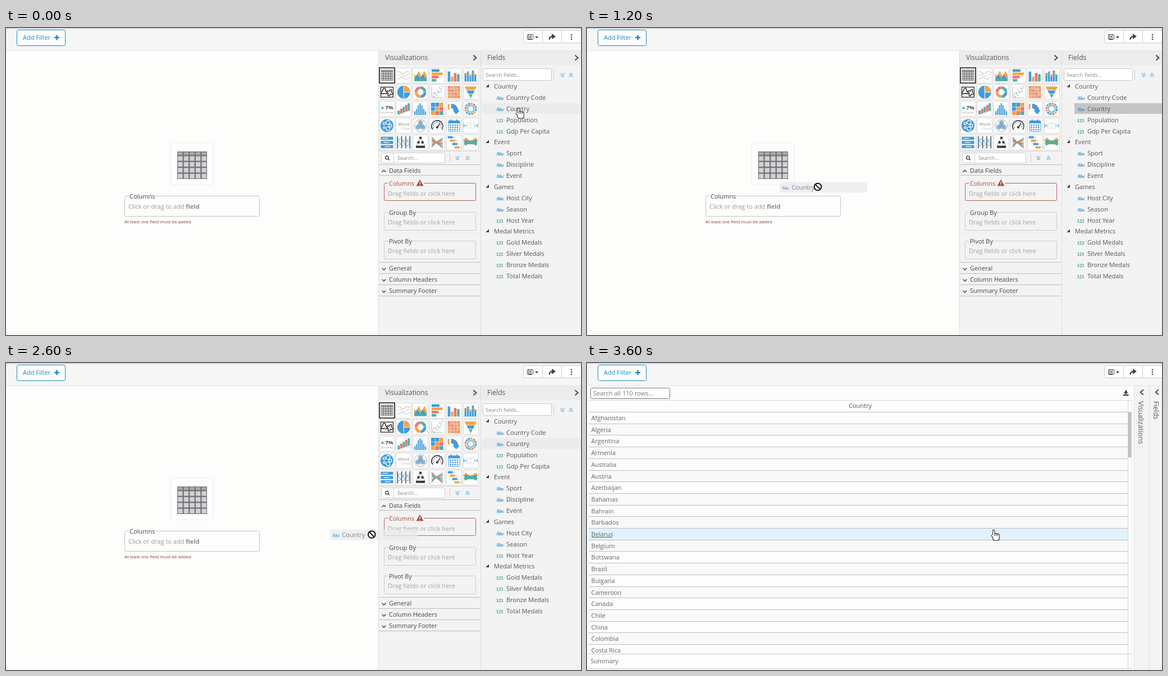
An HTML page with a canvas that plays this animation: 1024 by 547 pixels, repeating every 3.8 s.

```html
<!DOCTYPE html>
<html lang="en">
<head>
<meta charset="utf-8">
<title>Drag a field into a report</title>
<style>
html, body { margin: 0; width: 100%; height: 100%; overflow: hidden; background: #fdfdfc; }
canvas { display: block; width: 1024px; height: 547px; }
</style>
</head>
<body>
<canvas id="stage" width="1024" height="547"></canvas>
<script>
const g = document.getElementById('stage').getContext('2d');
const SANS = '"Open Sans", "Noto Sans", sans-serif';
const SERIF = '"Liberation Serif", serif';
const BLUE = '#429bdb', ORANGE = '#f5a443', TEAL = '#4fb59a', PINK = '#ee7379';
const COLORS = [BLUE, ORANGE, PINK, TEAL];
const INK = '#555', DARK = '#444', LINK = '#1c86c3', WARN = '#a94a45';
const PAGE = '#fdfdfc', PANEL = '#f3f3f3', RULE = '#bdbdbd', EDGE = '#dcdcdc';
const STEP = 200, STEPS = 19, TAU = 2 * Math.PI;
const { sin, cos, abs, floor } = Math;

function text(s, x, y, color = INK, size = 11, weight = 400, family = SANS) {
  g.font = `${weight} ${size}px ${family}`;
  g.fillStyle = color;
  g.fillText(s, x, y);
}
function rect(color, x, y, w, h) {
  g.fillStyle = color;
  g.fillRect(x, y, w, h);
}
const hline = (x, y, w, color = RULE) => rect(color, x, Math.round(y), w, 1);
const vline = (x, y, h, color = EDGE) => rect(color, x, y, 1, h);
function path(pts) {
  g.beginPath();
  for (let i = 0; i < pts.length; i += 2) g.lineTo(pts[i], pts[i + 1]);
}
function poly(color, ...pts) {
  path(pts);
  g.closePath();
  g.fillStyle = color;
  g.fill();
}
function line(color, width, ...pts) {
  path(pts);
  g.strokeStyle = color;
  g.lineWidth = width;
  g.stroke();
}
function round(x, y, w, h, r, fill, stroke) {
  g.beginPath();
  g.roundRect(x + .5, y + .5, w, h, r);
  if (fill) { g.fillStyle = fill; g.fill(); }
  if (stroke) { g.strokeStyle = stroke; g.lineWidth = 1; g.stroke(); }
}
function arc(color, width, x, y, r, from = 0, to = TAU) {
  g.beginPath();
  g.arc(x, y, r, from, to);
  g.strokeStyle = color;
  g.lineWidth = width;
  g.stroke();
}
function dot(color, x, y, r) {
  g.beginPath();
  g.arc(x, y, r, 0, TAU);
  g.fillStyle = color;
  g.fill();
}
function at(x, y, draw, turn = 0) {
  g.save();
  g.translate(x, y);
  g.rotate(turn);
  draw();
  g.restore();
}
const each = (n, fn) => { for (let i = 0; i < n; i++) fn(i); };
const grid = (cols, rows, fn) => each(rows, r => each(cols, c => fn(c, r)));
const sideChevron = (x, y, d) => line(DARK, 1.8, x - d, y - 4.5, x + d, y, x - d, y + 4.5);
const chevron = (x, y, d, color = DARK, width = 1.5) => line(color, width, x - 3.2, y - d, x, y + d, x + 3.2, y - d);
function expandCollapse(x, y, gap) {
  each(4, i => chevron(x + (i >> 1) * gap, y - 2 + i % 2 * 3.5, i < 2 ? 1.6 : -1.6, LINK, 1));
}

// Icon helpers work in a box from -11 to 11
function curve(f) {
  const pts = [];
  for (let x = -11; x <= 11; x++) pts.push(x, f(x));
  return pts;
}
const trace = (color, f, width = 1.2) => line(color, width, ...curve(f));
const area = (color, f, base = 10) => poly(color, -11, base, ...curve(f), 11, base);
const saw = (x, n) => abs((x / n % 1 + 1) % 1 - .5) * 2;
function bars(n, height, color = () => BLUE) {
  each(n, i => rect(color(i), -11 + i * 22 / n, 11 - height(i), 22 / n - 1, height(i)));
}
const ring = (n, r, width, gap = 0) =>
  each(n, i => arc(COLORS[i % 4], width, 0, 0, r, i * TAU / n, (i + 1) * TAU / n - gap));
function blob(k, r, wobble) {
  const pts = [];
  for (let a = 0; a <= TAU + .1; a += .2) {
    const d = r * (1 + wobble * sin(k * a));
    pts.push(d * cos(a), d * sin(a));
  }
  return pts;
}

function tableIcon(w, h, cell, frame) {
  rect(frame, 0, 0, w, h);
  const cw = w / 5, head = h * .15, ch = (h - head) / 4, p = w * .018 + .2;
  each(5, c => rect('#aaaaae', c * cw + p, p, cw - 2 * p, head - 2 * p));
  grid(5, 4, (c, r) => rect(cell, c * cw + p, head + r * ch + p, cw - 2 * p, ch - 2 * p));
}

const icons = [
  function table() { at(-11, -10, () => tableIcon(22, 20, '#ccc', '#77777b')); },
  function lines() {
    ['#a9d3f0', '#f8cf9b', '#c9c9c9'].forEach((c, i) => trace(c, x => 5 - i * 5 + 2 * sin(x / 2.4 + i)));
  },
  function areas() {
    [ORANGE, BLUE, TEAL].forEach((c, i) => area(c, x => -8 + i * 6 + 10 * saw(x - 2 + i * 3, 10) * (1 - i / 4)));
  },
  function rows() { each(4, i => rect(COLORS[i], -10, -11 + i * 5.8, 14 + 6 * sin(i * 1.7), 4.6)); },
  function columns() { bars(4, i => 13 + 5 * cos(i * 2.6), i => COLORS[i]); },
  function combo() {
    bars(5, i => 15 + 5 * sin(i * 2.5));
    trace(ORANGE, x => -4 + 4 * saw(x, 10), 1.5);
  },
  function map() {
    g.strokeStyle = '#333';
    g.lineWidth = 1.4;
    g.strokeRect(-11, -9, 22, 18);
    each(2, i => at(i * 10 - 5, i * 2 - 1, () => line('#333', 1.6, ...blob(3 + i, 4.5, .35))));
  },
  function pie() {
    dot(BLUE, 0, 0, 11.5);
    arc(ORANGE, 11.5, 0, 0, 5.75, -TAU / 4, 0);
    each(3, i => line('#fff', 1, 0, 0, 12 * cos(i * 1.57 - 1.57), 12 * sin(i * 1.57 - 1.57)));
  },
  function donut() { ring(4, 8, 5, .08); },
  function scatter() {
    line('#bbb', 1, -10, -10, -10, 10, 10, 10);
    each(13, i => dot(i % 3 ? BLUE : PINK, -8 + i * 1.4, 7 - i * 1.15 + 4 * sin(i * 4), .9));
  },
  function heat() {
    grid(4, 4, (c, r) => rect(`hsl(${12 + (c * 3 + r * 5) % 4 * 5} 78% 70%)`, -11 + c * 5.6, -11 + r * 5.6, 5.2, 5.2));
  },
  function funnel() {
    [ORANGE, BLUE, TEAL].forEach((c, i) => {
      const y = i * 7 - 10, w = 11 - i * 3.7;
      poly(c, -w, y, w, y, w - 3.2, y + 6, 3.2 - w, y + 6);
    });
  },
  function indicator() {
    poly(TEAL, -11, 0, -8, -5, -5, 0);
    text('7%', -3, 1, DARK, 9.5, 700);
    text('Since Last Year', -11, 8, '#888', 3.2);
  },
  function waterfall() { each(5, i => rect(i % 2 ? PINK : TEAL, -11 + i * 4.5, 3 - i * 3.3, 4, 7 + i * 1.6)); },
  function histogram() { bars(7, i => 5 + 16 * Math.exp(-((i - 3) ** 2) / 4)); },
  function treemap() {
    grid(3, 3, (c, r) => rect(COLORS[c + r < 3 ? (c + r) >> 1 : c + r - 1], -11 + c * 7.5, -11 + r * 7.5, 6.9, 6.9));
  },
  function flow() {
    rect(ORANGE, -11, -9, 3, 10);
    arc(BLUE, 8, -5, 4, 9, -TAU / 4, 0);
    poly(BLUE, -2, 3, 10, 3, 4, 10);
  },
  function chord() {
    ring(12, 9.5, 3, .12);
    arc('#8fc7d9', 3, 0, 0, 6);
  },
  function bubbles() {
    dot(BLUE, 0, 0, 11.5);
    each(5, i => arc('#fff', 1.3, 6 * cos(i * 1.26), 6 * sin(i * 1.26), 2.5 + sin(i * 2)));
  },
  function words() {
    text('Word', -10, 0, '#888', 8);
    text('Cloud', -5, 7, '#bbb', 6);
  },
  function radar() {
    each(2, i => arc('#aaa', .8, 0, 0, 11 - i * 5));
    poly('#7fb6dd', ...blob(3, 7, .4));
    each(3, i => at(0, 0, () => line('#999', .7, -11, 0, 11, 0), i * TAU / 6));
  },
  function gauge() {
    arc(DARK, 1.8, 0, 1, 10, 2.5, 6.92);
    each(7, i => dot(DARK, 7 * cos(2.8 + i * .61), 1 + 7 * sin(2.8 + i * .61), .8));
    line(DARK, 1.8, 0, 3, 5, -4);
    dot(DARK, 0, 3, 2.2);
  },
  function calendar() {
    round(-10, -9, 20, 19, 2, '#fff', BLUE);
    rect(BLUE, -10, -9, 20, 5);
    each(2, i => rect(BLUE, -6 + i * 10, -11, 2, 4));
    grid(4, 3, (c, r) => rect(BLUE, -7.5 + c * 4.2, -2 + r * 4, 2.6, 2.4));
  },
  function boxPlot() {
    each(2, i => {
      at(0, 0, () => line(BLUE, 1, -12, -3, -12, 3, -12, 0, -6, 0), i * TAU / 2);
      g.strokeRect(-6.5 + i * 6.5, -4.5, 6.5, 9);
    });
  },
  function list() {
    each(3, i => {
      rect(BLUE, -11, -10 + i * 7.5, 22, 5.5);
      rect('#d9eefa', -8 + i * 2, -8 + i * 7.5, 10, 1.5);
    });
  },
  function parallel() {
    each(4, i => line('#345', 1.4, -11 + i * 7.3, -11, -11 + i * 7.3, 11));
    each(3, i => trace(i ? BLUE : '#678', x => 6 * sin(x / 4 + i * 2), 1));
  },
  function tree() {
    each(2, i => line('#888', .8, 0, -8, i * 10 - 5, 0, i * 16 - 8, 8));
    [1, 2, 4].forEach((n, row) => each(n, i => rect('#333', (i - n / 2 + .5) * 18 / (n + .6) - 2, -10 + row * 8, 4, 4)));
  },
  function network() {
    each(6, i => line(COLORS[(i + 2) % 4], 1.8, -10, -9 + i * 3.5, -2, 0, 10, 10 - i * 3.5));
    dot('#c88', 0, 0, 2.5);
  },
  function gantt() {
    each(4, i => {
      rect(i % 2 ? ORANGE : BLUE, -11 + i * 4, -11 + i * 6, 9, 4);
      rect('#ccc', -1 + i * 4, -10 + i * 6, 3, 2);
    });
  },
  function sankey() {
    [ORANGE, BLUE, TEAL].forEach((c, i) => line(c, 7 - i, -11, i * 5 - 6, -4, 0, 4, 0, 11, i * 5 - 6));
  }
];

function topEdge() {
  rect(PAGE, 0, 0, 1024, 547);
  hline(0, 0, 1024, '#cfcfcf');
  hline(0, 1, 1024, '#e4e4e4');
}

function toolbar() {
  topEdge();
  rect('#f6f6f6', 0, 2, 1024, 38);
  hline(0, 40, 1024, '#e6e6e6');
  round(19, 3, 86, 28, 3, '#fff', LINK);
  text('Add Filter', 30, 21, LINK);
  line(LINK, 2.4, 86, 17, 95, 17);
  line(LINK, 2.4, 90.5, 12.5, 90.5, 21.5);
  round(921, 4, 106, 22, 3, '#fff', '#ccc');
  each(2, i => vline(955 + i * 34, 5, 22, '#ccc'));
  round(928, 11, 10, 9, 1, '#fff', DARK);
  each(2, i => round(930, 11 + i * 5, 5, 3, 0, '#fff', DARK));
  poly(DARK, 942, 15, 948, 15, 945, 18.5);
  poly(DARK, 972, 10, 979, 15, 972, 20);
  arc(DARK, 2.4, 973, 20.5, 5.5, TAU / 2, TAU * .75);
  each(3, i => dot(DARK, 1007, 12 + i * 4, 1.3));
}

function dropBox(x, y, w, h, label, gap, color, back = PANEL, labelColor = DARK) {
  round(x, y, w, h, 2, null, color);
  rect(back, x + 7, y - 1, gap, 3);
  text(label, x + 9, y + 4.5, labelColor);
}

function canvasArea() {
  round(293, 204, 75, 75, 4, '#fefefe', '#ececec');
  at(305, 220, () => tableIcon(53, 49, '#d2d2d4', '#737378'));
  dropBox(211, 299, 240, 36, 'Columns', 48, '#c4c4c4', PAGE);
  const hint = 'Click or drag to add ';
  text(hint, 218, 322, '#999');
  text('field', 218 + g.measureText(hint).width, 322, '#8a8a8a', 11, 700);
  text('At least one field must be added', 211, 348, '#8f3f3a', 7.9);
}

function panel(x, w, title) {
  rect(PANEL, x, 41, w, 506);
  rect('#ececec', x, 41, w, 25);
  vline(x, 41, 506);
  text(title, x + 12, 57, INK, 12.1, 500);
  sideChevron(x + w - 10, 53, 2.6);
}

function visPanel(over) {
  panel(663, 182, 'Visualizations');
  icons.forEach((draw, i) => {
    const x = 678.5 + i % 6 * 29.8, y = 84.5 + floor(i / 6) * 29.8;
    round(Math.round(x - 14), Math.round(y - 14), 27, 27, 1, '#fdfdfd', '#dadada');
    at(x, y, draw);
  });
  g.strokeStyle = DARK;
  g.lineWidth = 2;
  g.strokeRect(665, 71, 27, 27);

  hline(664, 219, 181, '#d4d4d4');
  round(668, 222, 113, 18, 2, '#fff', '#ccc');
  vline(690, 223, 18, '#ccc');
  arc(DARK, 1.4, 678.5, 231, 2.8);
  line(DARK, 1.6, 680.5, 233, 683, 235.5);
  text('Search...', 697, 235, '#888', 9.3);
  vline(790, 224, 15, '#ccc');
  expandCollapse(804, 232, 18);

  hline(664, 243, 181);
  hline(664, 262, 181);
  chevron(673, 255, -1.7);
  text('Data Fields', 682, 258, DARK);
  const d = over ? 3.4 : 0, hint = 'Drag fields or click here';
  dropBox(673, 276, 163, 31 + d, 'Columns', 64, '#b5605b', PANEL, WARN);
  poly(WARN, 737, 270, 743.5, 281.5, 730.5, 281.5);
  line('#fff', 1.4, 737, 274, 737, 278);
  dot('#fff', 737, 279.8, .8);
  if (over) {
    round(678, 288, 154, 19, 2, '#fff', '#ddd');
    text('Abc', 687, 301, '#a5cfea', 8, 700, SERIF);
    text('Country', 701, 301, '#aaa');
  } else {
    text(hint, 680, 298.5, '#a3a3a3');
  }
  ['Group By', 'Pivot By'].forEach((s, i) => {
    const y = 327.5 + i * 51.4 + d;
    hline(664, y - 14, 181, '#ececec');
    dropBox(673, Math.round(y), 163, 32, s, 50 - i * 6, '#cacaca');
    text(hint, 680, y + 22, '#a3a3a3');
  });
  hline(664, 417 + d, 181);
  ['General', 'Column Headers', 'Summary Footer'].forEach((s, i) => {
    const y = 428 + i * 20 + d;
    chevron(673, y + 1.5, 1.7);
    text(s, 682, y + 4, DARK);
    hline(664, y + 9, 181);
  });
}

const groups = {
  Country: ['Country Code', 'Country', '#Population', '#Gdp Per Capita'],
  Event: ['Sport', 'Discipline', 'Event'],
  Games: ['Host City', 'Season', '#Host Year'],
  'Medal Metrics': ['#Gold Medals', '#Silver Medals', '#Bronze Medals', '#Total Medals']
};

function fieldsPanel(dragged) {
  panel(845, 181, 'Fields');
  round(849, 72, 122, 21, 2, '#fff', '#c8c8c8');
  text('Search fields...', 854, 87, '#888', 9.4);
  vline(975, 75, 17, '#ccc');
  expandCollapse(991, 84, 15);
  if (dragged) rect('#c5c5c5', 868, 134, 156, 19);
  else rect('#ebebeb', 848, 134, 176, 19);
  let y = 108;
  for (const [name, fields] of Object.entries(groups)) {
    poly('#333', 860, y - 8, 860, y - 2.5, 854.5, y - 2.5);
    text(name, 869, y);
    y += 19.88;
    for (const f of fields) {
      const num = f[0] === '#';
      text(num ? '123' : 'Abc', 873, y, num ? '#2f9a80' : '#2187c4', 8, 700, SERIF);
      text(f.replace('#', ''), 891, y);
      y += 19.88;
    }
  }
}

function hand(x, y) {
  const shape = (color, grow) => {
    each(4, i => {
      const top = i ? 6 + i * .5 : .5;
      round(2.6 + i * 2.7 - grow, top - grow, 2.4 + 2 * grow, 10 + 2 * grow, 1.5, color);
    });
    round(3 - grow, 10 - grow, 10 + 2 * grow, 8 + 2 * grow, 3, color);
    line(color, 2.4 + 2 * grow, 1.4 - grow / 2, 9.6 - grow / 2, 5.5, 14.5);
  };
  at(x, y, () => {
    shape('#222', 1);
    shape('#fff', 0);
    each(3, i => line('#222', .8, 5.9 + i * 2.7, 7.5, 5.9 + i * 2.7, 11));
  });
}
function arrow(x, y) {
  at(x, y, () => {
    poly('#fff', 0, 0, 0, 14, 3.2, 11, 5.3, 15.6, 7.3, 14.7, 5.3, 10, 9.6, 9.8);
    g.strokeStyle = '#222';
    g.lineWidth = 1;
    g.stroke();
  });
}
function denied(x, y) {
  dot('#fff', x, y, 7.2);
  arc('#111', 2, x, y, 6.3);
  line('#111', 2, x - 4.4, y - 4.4, x + 4.4, y + 4.4);
}
function ghost(x, y) {
  g.globalAlpha = .75;
  round(x, y - 10, 156, 19, 3, '#ebebef');
  text('Abc', x + 4, y + 4, '#2187c4', 8, 700, SERIF);
  text('Country', x + 21.5, y + 4, '#606060');
  g.globalAlpha = 1;
}

// Pointer route: step, x, y
const route = [[2, 831, 162], [4, 672, 219], [5, 489, 248], [6, 411, 283], [8, 295, 330], [11, 512, 321.5], [14, 721, 297.5], [15, 725, 297.5]];
function pointer(step) {
  const i = route.findIndex(p => p[0] >= step);
  const to = route[i], from = route[i - 1] || to;
  const u = (step - from[0]) / (to[0] - from[0] || 1);
  return [1, 2].map(k => from[k] + (to[k] - from[k]) * u);
}

function designer(step) {
  const over = step >= 14;
  toolbar();
  canvasArea();
  visPanel(over);
  fieldsPanel(step >= 2 && step < 8);
  if (step < 2) return hand(908, 142);
  const [x, y] = pointer(step);
  // The dragged label trails a little behind the pointer
  ghost(x - 63 - 13 * sin(Math.PI * (step - 2) / 18) ** 2, y + .7);
  if (!over) return denied(x, y);
  arrow(x + .5, y);
  round(x + 1, y + 12, 8, 6, 1, '#fff', DARK);
}

function loading() {
  topEdge();
  each(8, i => {
    const a = -TAU / 8 * (i + 1);
    dot('#1283d0', 441.5 + 9.4 * cos(a), 247.5 + 9.4 * sin(a), 3 - Math.min(i, 5) * .27);
  });
  text('Cancel', 425, 278.5, '#666');
  arrow(725.5, 297.5);
}

const countries = ('Afghanistan,Algeria,Argentina,Armenia,Australia,Austria,Azerbaijan,Bahamas,Bahrain,Barbados,' +
  'Belarus,Belgium,Botswana,Brazil,Bulgaria,Cameroon,Canada,Chile,China,Colombia,Costa Rica').split(',');

function report() {
  toolbar();
  round(6, 44, 141, 19, 2, '#fff', '#777');
  text('Search all 110 rows...', 11, 58, '#777');
  line(DARK, 3.4, 959.7, 49, 959.7, 53);
  poly(DARK, 955.5, 52, 964, 52, 959.7, 56);
  rect(DARK, 955, 56, 9.5, 2.4);
  hline(3, 66, 967, '#d6d6d6');
  text('Country', 466, 80);
  countries.forEach((name, i) => {
    const y = 87 + i * 20.7, top = Math.round(y);
    const hover = name === 'Belarus';
    if (hover || i % 2) rect(hover ? '#e2f2fc' : '#f9f9fc', 3, top, 960, 21);
    hline(3, top, 960);
    text(name, 7.5, y + 15, '#666');
    if (hover) hline(8, y + 16, 37, '#666');
  });
  rect(PAGE, 3, 518, 967, 29);
  hline(963, 87, 7);
  hline(3, 518, 967, '#c8c8c8');
  text('Summary', 6.5, 535, '#666');
  hline(3, 544, 967, '#c8c8c8');
  vline(963, 66, 478, '#d6d6d6');
  vline(970, 66, 478, '#e4e4e4');
  round(963, 87, 6, 81, 3, '#c1c1c1');
  ['Visualizations', 'Fields'].forEach((s, i) => {
    const x = 974 + i * 27;
    rect('#f4f4f4', x, 41, 27, 506);
    vline(x, 41, 506);
    sideChevron(x + 14.3, 52, -2.6);
    at(x + 8.3, 68, () => text(s, 0, 0, INK, 12.1, 500), TAU / 4);
  });
  hand(720, 297);
}

function frame() {
  const step = floor(performance.now() / STEP) % STEPS;
  if (step < 16) designer(step);
  else if (step === 16) loading();
  else report();
  requestAnimationFrame(frame);
}
frame();
</script>
</body>
</html>
```
